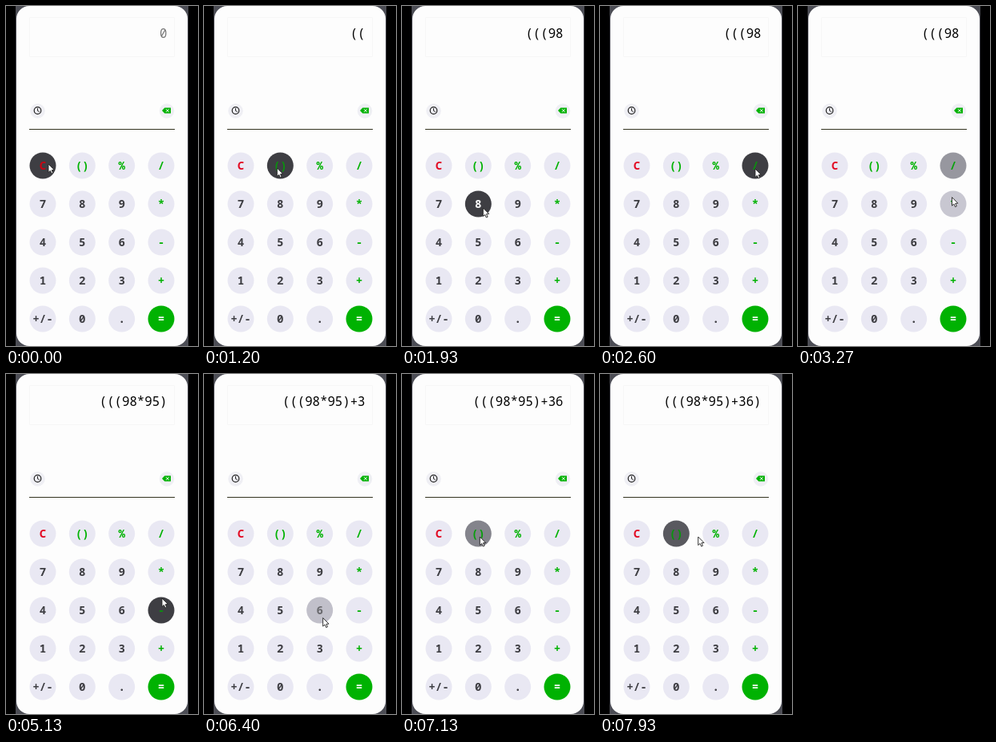
An HTML page with a canvas for the animation above (8 s loop, 240x426 px).

```html
<!DOCTYPE html>
<html lang="en">
<head>
<meta charset="utf-8">
<title>Calculator</title>
<style>
  html, body { margin: 0; width: 100%; height: 100%; overflow: hidden; background: #000; }
  canvas { display: block; width: 240px; height: 426px; }
</style>
</head>
<body>
<canvas id="stage"></canvas>
<script>
const W = 240, H = 426, LOOP = 8000, FPS = 15;
const FADE = 200, TRAVEL = 200, RADIUS = 16.5;
const canvas = document.getElementById('stage');
const ctx = canvas.getContext('2d');
const dpr = window.devicePixelRatio || 1;
canvas.width = W * dpr;
canvas.height = H * dpr;
ctx.scale(dpr, dpr);

const MONO = '"Noto Sans Mono", "DejaVu Sans Mono", monospace';
const INK = [62, 62, 67], PALE = [233, 232, 243], WHITE = [250, 250, 250];
const GREEN = [0, 178, 2], DIM_GREEN = [10, 146, 14], RED = [226, 8, 34], DIM_RED = [200, 4, 18];

const labels = ['C', '()', '%', '/', '7', '8', '9', '*', '4', '5', '6', '-',
                '1', '2', '3', '+', '+/-', '0', '.', '='];
const buttons = labels.map((label, i) => ({
  label,
  x: 46 + (i % 4) * 49.33,
  y: 200 + Math.floor(i / 4) * 48
}));

// Pointer stops: button, characters typed there, departure time, offset from its centre
const visit = (label, keys, leave, dx = 2, dy = 4) => {
  const button = buttons[labels.indexOf(label)];
  return { keys, leave, x: button.x + dx, y: button.y + dy };
};
const route = [
  visit('C', '', 440, 7, -2),
  visit('()', '(((', 1360, -4, 3),
  visit('9', '9', 1580),
  visit('8', '8', 2060, 6, 5),
  visit('/', '', 3133, 0),
  visit('*', '*', 3560, -2),
  visit('9', '9', 3900),
  visit('5', '5', 4260),
  visit('()', ')', 4640),
  visit('-', '', 5180, 1, -15),
  visit('+', '+', 5600),
  visit('3', '3', 5960),
  visit('3', '', 6277, 4, -19),
  visit('6', '6', 6900, 4, 0),
  visit('()', ')', 7867),
  visit('/', '', LOOP)
];

// Key presses spread evenly over each stay
const presses = route.flatMap(({ keys, leave }, i) => {
  const arrive = i ? route[i - 1].leave + TRAVEL : 0;
  return [...keys].map((key, n) => ({
    key,
    time: arrive + (leave - arrive) * (n + 0.5) / keys.length
  }));
});

const clamp = v => Math.max(0, Math.min(1, v));
const smooth = v => v * v * (3 - 2 * v);
const easeOut = v => Math.sin(v * Math.PI / 2);
const mix = (a, b, k) => a.map((v, i) => v + (b[i] - v) * k);
const rgb = c => `rgb(${c.map(Math.round).join(',')})`;

function pointerAt(t) {
  const i = Math.max(0, route.findIndex(stop => t < stop.leave));
  const to = route[i], from = route[i - 1];
  if (!from) return { x: to.x, y: to.y };
  const k = smooth(clamp((t - from.leave) / TRAVEL));
  return { x: from.x + (to.x - from.x) * k, y: from.y + (to.y - from.y) * k };
}

// Share of the recent past spent over a button gives its hover fade
function hoverAmount(button, trail) {
  const inside = trail.map(p => Math.hypot(p.x - button.x, p.y - button.y) < RADIUS);
  const share = inside.filter(Boolean).length / trail.length;
  return inside[0] ? easeOut(share) : 1 - easeOut(1 - share);
}

function disc(x, y, r, color) {
  ctx.fillStyle = color;
  ctx.beginPath();
  ctx.arc(x, y, r, 0, Math.PI * 2);
  ctx.fill();
}

function line(points, color, width) {
  ctx.strokeStyle = color;
  ctx.lineWidth = width;
  ctx.beginPath();
  points.forEach(([x, y]) => ctx.lineTo(x, y));
  ctx.stroke();
}

function text(str, x, y, font, color, align) {
  ctx.font = font;
  ctx.fillStyle = color;
  ctx.textAlign = align;
  ctx.fillText(str, x, y);
}

function drawCard() {
  ctx.fillStyle = '#000';
  ctx.fillRect(0, 0, W, H);
  ctx.fillStyle = '#4c4d55';
  ctx.fillRect(12, 0, 216, H);
  ctx.fillStyle = '#fdfdfd';
  ctx.beginPath();
  ctx.roundRect(13, 0, 214, H, 16);
  ctx.fill();
  ctx.strokeStyle = '#f7f7f7';
  ctx.lineWidth = 1;
  ctx.strokeRect(29.5, 14.5, 181, 49);
  line([[29, 154.5], [211, 154.5]], '#33331f', 1);
}

function drawIcons() {
  disc(39.5, 131.5, 9.3, '#efeff4');
  ctx.strokeStyle = '#222';
  ctx.lineWidth = 1.2;
  ctx.beginPath();
  ctx.arc(39.5, 131, 4.3, 0, Math.PI * 2);
  ctx.stroke();
  line([[39.5, 128.2], [39.5, 131.3], [41.7, 132.5]], '#222', 1);

  disc(201, 131.5, 9.3, '#efeff4');
  ctx.fillStyle = rgb(GREEN);
  ctx.beginPath();
  [[195, 131], [198.3, 127.5], [206, 127.5], [206, 134.5], [198.3, 134.5]]
    .forEach(([x, y]) => ctx.lineTo(x, y));
  ctx.fill();
  line([[200, 129.2], [203.6, 132.8]], '#fff', 1);
  line([[203.6, 129.2], [200, 132.8]], '#fff', 1);
}

function drawDisplay(t) {
  const typed = presses.filter(p => p.time <= t).map(p => p.key).join('');
  text(typed || '0', 201.5, 39.5, '500 15.7px ' + MONO, typed ? '#000' : '#777', 'right');
}

function labelColor(label, k) {
  if (label === '=') return WHITE;
  if (label === 'C') return mix(RED, DIM_RED, k);
  if (['()', '%', '/', '*', '-', '+'].includes(label)) return mix(GREEN, DIM_GREEN, k);
  return mix(INK, WHITE, k);
}

function drawButtons(t) {
  const trail = Array.from({ length: 40 }, (_, i) => pointerAt(t - FADE * i / 40));
  for (const b of buttons) {
    const k = hoverAmount(b, trail);
    const base = b.label === '=' ? GREEN : PALE;
    disc(b.x, b.y, RADIUS, rgb(mix(base, INK, k)));
    text(b.label, b.x, b.y + 5.2, '600 14.2px ' + MONO, rgb(labelColor(b.label, k)), 'center');
  }
}

function drawPointer({ x, y }) {
  ctx.beginPath();
  [[0, 0], [0, 10.5], [2.4, 8.4], [4, 12], [5.8, 11.2], [4.2, 7.7], [7.4, 7.5]]
    .forEach(([dx, dy]) => ctx.lineTo(x + dx, y + dy));
  ctx.closePath();
  ctx.fillStyle = '#fff';
  ctx.fill();
  ctx.strokeStyle = '#222';
  ctx.lineWidth = 0.9;
  ctx.lineJoin = 'round';
  ctx.stroke();
}

function draw(now) {
  const step = Math.floor((now % LOOP + 4) * FPS / 1000) % (LOOP * FPS / 1000);
  const t = step * 1000 / FPS;
  drawCard();
  drawDisplay(t);
  drawIcons();
  drawButtons(t);
  drawPointer(pointerAt(t));
}

let begin = null;
function tick(now) {
  if (begin === null) begin = now;
  draw(Math.max(0, now - begin));
  requestAnimationFrame(tick);
}
draw(0);
requestAnimationFrame(tick);
</script>
</body>
</html>
```
